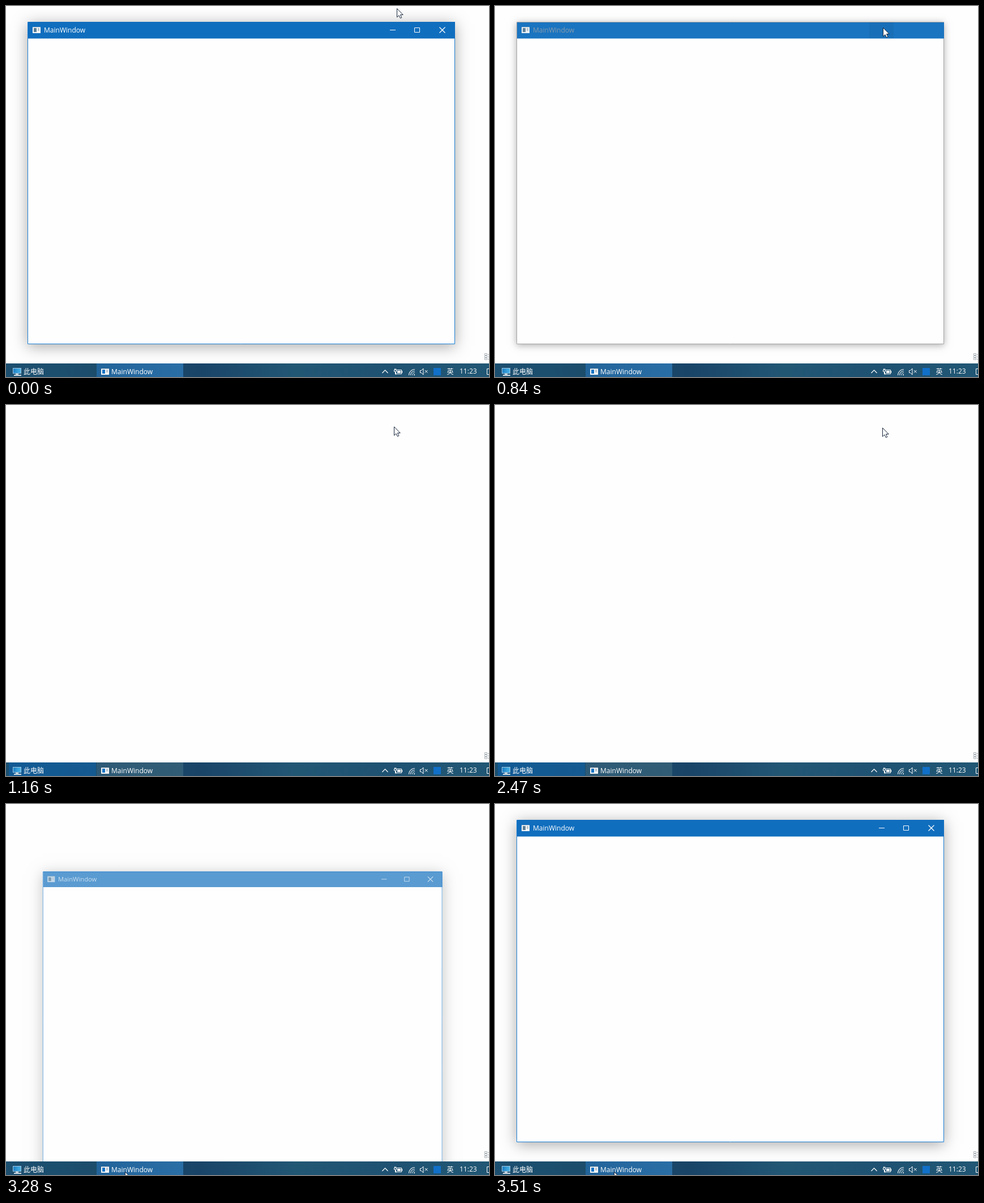
Animation, 853 px wide and 656 px high, one loop 4060 ms. Source, as an HTML page with a canvas:

```html
<!DOCTYPE html>
<html lang="zh">
<head>
<meta charset="utf-8">
<style>
html, body { margin: 0; width: 100%; height: 100%; overflow: hidden; background: #fefefe; }
canvas { display: block; }
</style>
</head>
<body>
<canvas id="stage" width="853" height="656"></canvas>
<script>
const ctx = document.getElementById('stage').getContext('2d');
const LOOP = 4060;
const MINIMIZE = 840, RESTORE = 3280;
const FONT = '12px "Open Sans", "Noto Sans CJK SC", "Noto Sans CJK", sans-serif';

// Progress from 0 to 1 in equal hard steps, the first one at `start`.
function stepped(t, start, interval, count) {
  const step = Math.floor((t - start) / interval) + 1;
  return Math.max(0, Math.min(step, count)) / count;
}

function rect(color, x, y, w, h) {
  ctx.fillStyle = color;
  ctx.fillRect(x, y, w, h);
}

function line(color, path, width = 1) {
  ctx.strokeStyle = color;
  ctx.lineWidth = width;
  ctx.stroke(new Path2D(path));
}

function shape(color, path) {
  ctx.fillStyle = color;
  ctx.fill(new Path2D(path));
}

function text(color, str, x, y) {
  ctx.font = FONT;
  ctx.fillStyle = color;
  ctx.fillText(str, x, y);
}

function gradient(x, y, w, h, colors) {
  const fill = ctx.createLinearGradient(x, 0, x + w, 0);
  colors.forEach((c, i) => fill.addColorStop(i / (colors.length - 1), c));
  rect(fill, x, y, w, h);
}

function appIcon(x, y, accent) {
  rect('#f4f6f8', x, y, 14, 11);
  rect('#c3cad0', x, y, 14, 1);
  rect(accent, x + 2, y + 2, 5, 7);
  rect('#b9c4cc', x + 9, y + 2, 3, 5);
}

// `drop` runs from 0 (in place) to 1 (fully sunk towards the taskbar).
function windowPose(t) {
  if (t < MINIMIZE) return { drop: 0, alpha: 1 };
  if (t < RESTORE) {
    const p = stepped(t, MINIMIZE + 80, 80, 4);
    return { drop: p ** .6, alpha: .955 * (1 - p) ** 2 };
  }
  const left = 1 - stepped(t, RESTORE, 76, 4);
  return { drop: left ** 5.3, alpha: 1 - left ** 4 };
}

function drawWindow(t) {
  const { drop, alpha } = windowPose(t);
  if (!alpha) return;
  const active = t < MINIMIZE || t >= RESTORE;
  const scale = 1 - .3 * drop;
  ctx.save();
  ctx.translate(415.5 + 10 * drop - 377.5 * scale, 28 + 420 * drop);
  ctx.scale(scale, scale);

  ctx.globalAlpha = alpha;
  ctx.shadowColor = 'rgba(0,0,0,.34)';
  ctx.shadowBlur = active ? 24 : 12;
  ctx.shadowOffsetY = active ? 4 : 2;
  rect('#fefefe', 0, 0, 755, 570);
  ctx.shadowColor = 'transparent';
  // Hide the part of the shadow that lies behind the translucent window.
  ctx.globalAlpha = 1;
  rect('#fefefe', 0, 0, 755, 570);
  ctx.globalAlpha = alpha;

  line(active ? '#1a7fd4' : '#a2a2a2', 'M.5 .5H754.5V569.5H.5Z');
  rect('#106ebe', 1, active ? 0 : 1, 754, active ? 29.5 : 28.5);
  const hovered = t >= 360 && t < MINIMIZE + 80;
  const pressed = t >= 680 && active;
  if (hovered) rect(`rgba(0,0,0,${pressed ? .2 : active ? .1 : .05})`, 623, 1, 43, 28);
  appIcon(9, 9, '#5c7f96');
  text(active ? '#fff' : '#8a9dac', 'MainWindow', 29, 19);
  if (active) {
    line('#fff', 'M640 14.5h10M683.5 10.5h9v8h-9Z');
    line('#fff', 'M727.5 9.5l10 10M737.5 9.5l-10 10', 1.3);
  }
  ctx.restore();
}

function drawTaskbar(t) {
  const open = t < MINIMIZE + 80 || t >= RESTORE;
  gradient(0, 632, 853, 24, ['#1c4f70', '#1c4d6b', '#194468', '#225774', '#1f5272', '#215774']);
  if (!open) gradient(5, 632, 154, 24, ['#125a94', '#155a90']);
  gradient(160, 632, 153, 24, open ? ['#22649a', '#2a6ea6'] : ['#2d5a76', '#315d76']);

  rect('#9fc6df', 12, 640, 15, 10);
  gradient(13, 641, 13, 8, ['#1d7fc4', '#49b4e6']);
  rect('#b9cbd6', 17, 650, 5, 2);
  rect('#d2dde4', 14, 652, 13, 2);
  text('#fff', '此电脑', 31, 651);
  appIcon(168, 641, '#1274c4');
  text('#fff', 'MainWindow', 186, 651);

  line('#fff', 'M664.5 649l5-5.2 5 5.2', 1.2);
  // Battery with plug
  line('#fff', 'M690 643.5h8.5v7h-10v-3M685.5 643.5h4v3h-4ZM686.5 641v2M688.5 641v2M687.5 647v4h2');
  rect('#fff', 691, 645, 6, 4);
  rect('#fff', 699, 645, 1, 4);
  // Wireless
  for (let r = 4.5; r < 11; r += 3) line('#dfe7ec', `M${722 - r} 653a${r} ${r} 0 0 1 ${r} ${-r}`, 1.1);
  shape('#fff', 'M720 653a2 2 0 0 1 2-2v2Z');
  // Muted speaker
  line('#fff', 'M731.5 644.5h2l3.5-3.5v11l-3.5-3.5h-2ZM740 644l4.5 4.5M744.5 644l-4.5 4.5');
  rect('#1170c8', 755, 640, 13, 13);
  text('#fff', '英', 778.5, 651);
  text('#fff', '11:23', 801, 650);
  line('#fff', 'M854 641.5h-4.5v10h4.5');
}

function cursorPosition(t) {
  if (t >= 2870) return [210, 650];
  if (t >= 2470) return [684, 40];
  const p = stepped(t, 70, 72, 6);
  return [690 - 5 * p, 4 + 34 * p];
}

function drawCursor(t) {
  if (t >= 2560 && t < 2870) return;
  const [x, y] = cursorPosition(t);
  const arrow = 'M.5 .5V15.8L4 12.6 6.4 17.6 8.8 16.5 6.5 11.5H11.2Z';
  ctx.save();
  ctx.translate(Math.round(x), Math.round(y));
  shape('#fff', arrow);
  line('#17263c', arrow);
  ctx.restore();
}

function drawListIcon() {
  for (let y = 614.5; y < 624; y += 4) line('#a9b0b6', `M845.5 ${y}h4v3h-4ZM851 ${y + 2}h2`);
}

function draw(t) {
  rect('#fefefe', 0, 0, 853, 656);
  drawListIcon();
  drawWindow(t);
  drawTaskbar(t);
  drawCursor(t);
}

const start = performance.now();
function loop() {
  draw((performance.now() - start) % LOOP);
  requestAnimationFrame(loop);
}
loop();
</script>
</body>
</html>
```
